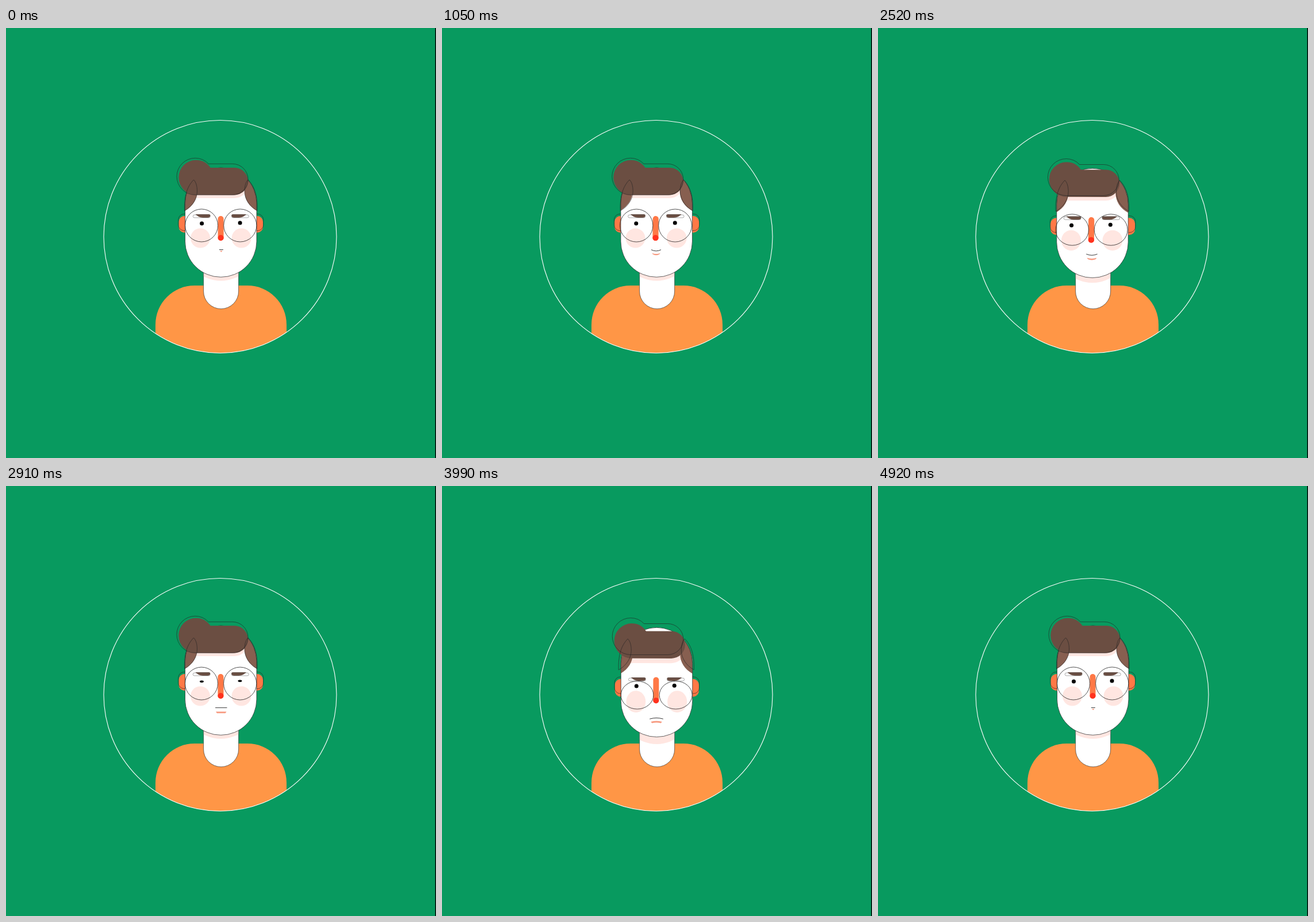
Write an HTML page with a canvas that moves like this. It is 748 px wide and 748 px high and loops after 4950 ms.

```html
<!DOCTYPE html>
<html lang="en">
<head>
<meta charset="utf-8">
<title>Portrait</title>
<style>
  html, body { margin: 0; width: 100%; height: 100%; overflow: hidden; background: #089a5f; }
  canvas { display: block; width: 100vw; height: 100vh; }
</style>
</head>
<body>
<canvas id="stage" width="748" height="748"></canvas>
<script>
const ctx = document.getElementById('stage').getContext('2d');
const LOOP = 4950;
const MID = 373.75;
const C = {
  bg: '#089a5f', shirt: '#ff9646', skin: '#fff', blush: '#ffe6e1', hair: '#6b4e42',
  lock: '#875f50', ear: '#ff7846', tip: '#ff321e', lip: '#f79a80', line: '#222'
};

const easeOut = p => 1 - (1 - p) ** 3;
const easeSine = p => (1 - Math.cos(Math.PI * p)) / 2;
const easeBack = p => 1 + 2.9 * (p - 1) ** 3 + 1.9 * (p - 1) ** 2;

// Tracks: [time, value, easing of the move that ends here]
const TURN = [[0, 0], [570, 1], [900, 1], [1230, 0, easeBack], [1530, 0], [2040, -.15], [2490, -.15], [3030, 0]];
const RISE = [[3030, 0], [3600, 1], [3660, 1], [4300, 0]];
const DROP = [[1530, 0], [2040, .36], [2490, .36], [3030, 0], [3660, 0], [4300, 1], [4590, 1], [4920, 0]];
const BLINK = [[330, 1], [450, .1, easeSine], [600, 1, easeSine], [2850, 1], [2970, .1, easeSine], [3120, 1, easeSine]];

// Mouth: half width, bend, lip half width, lip offset, lip height
const SMALL = [3.5, 0, 2, 2, 1.8];
const SMILE = [9.5, 2.6, 8.3, 6.5, 2.4];
const FLAT = [10.2, 0, 9.2, 6.8, 2.8];
const FROWN = [12, -2, 9.7, 4.6, 2.5];
const MOUTH = [[900, SMALL], [1230, SMILE], [2490, SMILE], [2900, FLAT], [3660, FLAT], [4300, FROWN], [4590, FROWN], [4920, SMALL]];

const mix = (a, b, p) => Array.isArray(a) ? a.map((x, i) => mix(x, b[i], p)) : a + (b - a) * p;

function sample(track, t) {
  const i = track.findIndex(k => k[0] > t);
  if (i < 0) return track[track.length - 1][1];
  if (i === 0) return track[0][1];
  const [t0, a] = track[i - 1], [t1, b, ease = easeOut] = track[i];
  return mix(a, b, ease((t - t0) / (t1 - t0)));
}

function fill(color) {
  ctx.fillStyle = color;
  ctx.fill();
}

function stroke(color = C.line, width = .7) {
  ctx.strokeStyle = color;
  ctx.lineWidth = width;
  ctx.stroke();
}

function box(x, y, w, h, r) {
  ctx.beginPath();
  ctx.roundRect(x, y, w, h, r);
}

function oval(x, y, rx, ry = rx) {
  ctx.beginPath();
  ctx.ellipse(x, y, rx, ry, 0, 0, 2 * Math.PI);
}

function clipped(shape, draw) {
  ctx.save();
  shape();
  ctx.clip();
  draw();
  ctx.restore();
}

// Draws with the right-hand side as is (s = 1) or mirrored (s = -1)
function side(s, dx, dy, draw) {
  ctx.save();
  ctx.translate(MID + dx, dy);
  ctx.scale(s, 1);
  ctx.translate(-MID, 0);
  draw();
  ctx.restore();
}

function quiff(cx, cy, r, right, top, bottom) {
  const k = (bottom - top) / 2;
  ctx.beginPath();
  ctx.arc(cx, cy, r, Math.PI / 2, 2 * Math.PI + Math.asin((top - cy) / r));
  ctx.arcTo(right, top, right, bottom, k);
  ctx.arcTo(right, bottom, cx, bottom, k);
  ctx.closePath();
}

function lockFill() {
  ctx.beginPath();
  ctx.moveTo(421, 250);
  ctx.lineTo(470, 250);
  ctx.lineTo(470, 325);
  ctx.lineTo(442, 320.5);
  ctx.bezierCurveTo(424, 313, 415, 299, 415, 284);
  ctx.bezierCurveTo(415, 275, 417, 268, 421, 250);
  fill(C.lock);
}

function lockLine() {
  ctx.beginPath();
  ctx.moveTo(421, 264);
  ctx.bezierCurveTo(432, 275, 438, 292, 437, 318);
  ctx.bezierCurveTo(424, 311, 415, 298, 415, 284);
  ctx.bezierCurveTo(415, 275, 417, 268, 421, 264);
  stroke(C.line, .6);
}

function brow() {
  ctx.beginPath();
  ctx.moveTo(418, 324);
  ctx.lineTo(395, 324);
  ctx.quadraticCurveTo(391.5, 324, 392.3, 327);
  ctx.quadraticCurveTo(393, 330, 397, 330);
  ctx.lineTo(405, 330);
  ctx.quadraticCurveTo(413, 329.5, 418, 324);
  fill(C.hair);
  box(392.3, 325, 30, 5, 2.5);
  stroke('#555', .5);
}

function mouth(x, y, [w, bend, lw, gap, h]) {
  ctx.beginPath();
  ctx.moveTo(x - w, y);
  ctx.quadraticCurveTo(x, y + 2 * bend, x + w, y);
  stroke(C.line, .9);
  const top = y + gap, inset = Math.min(1.8, lw * .6);
  ctx.beginPath();
  ctx.moveTo(x - lw, top);
  ctx.quadraticCurveTo(x, top + 1.4 * bend, x + lw, top);
  ctx.lineTo(x + lw - inset, top + h);
  ctx.quadraticCurveTo(x, top + h + 1.4 * bend, x - lw + inset, top + h);
  ctx.closePath();
  fill(C.lip);
}

function backdrop() {
  ctx.fillStyle = C.bg;
  ctx.fillRect(0, 0, 748, 748);
  ctx.fillStyle = '#000';
  ctx.fillRect(746.6, 0, 1.4, 748);
  const ring = () => oval(372.5, 363, 202.5);
  clipped(ring, () => {
    box(260, 448, 228, 200, 68);
    fill(C.shirt);
  });
  ring();
  stroke('#fff', 1.1);
}

function draw(t) {
  const turn = sample(TURN, t), rise = sample(RISE, t), drop = sample(DROP, t);
  // Rest value plus its shift when turned right, raised and lowered
  const v = (rest, r = 0, u = 0, d = 0) => rest + turn * r + rise * u + drop * d;

  backdrop();

  const headX = v(311.5, 6, -2.5, 0), headY = v(243, 0, -2.5, 4);
  const head = (dy = 0) => box(headX, headY + dy, 124.5, 190.3, 62.2);
  const neck = () => box(343.6, 390, 61, 98.5, 30.5);

  neck();
  fill(C.skin);
  clipped(neck, () => {
    head(v(6.5, -.5, -3.5, 7));
    fill(C.blush);
  });
  neck();
  stroke(C.line, .6);

  const earY = v(0, 0, -9, 11);
  for (const s of [1, -1]) {
    const earX = s > 0 ? v(0, -1, -1, 0) : v(0, 3.5, 2.5, 0);
    side(s, earX, earY, () => {
      box(421, 327, 26, v(29, 0, -1, 2), 10);
      fill(C.ear);
    });
    side(s, earX, v(-3.5, 0, -6.5, 10.5), () => {
      box(421, 327, 26.7, 29, 10);
      stroke(C.line, .6);
    });
  }

  // Head, brow shadow and side hair
  const hairX = v(330.5, 21.5, -9.5, .5), hairRight = v(421, 14, -7, 3), hairY = v(0, 0, -7, 11.5);
  const hair = dy => quiff(hairX, 260 + dy, 30.3, hairRight, 243 + dy, 290.5 + dy);
  head();
  fill(C.skin);
  clipped(() => head(), () => {
    hair(hairY + v(5.5, 0, .5, 3));
    fill(C.blush);
    for (const s of [1, -1]) side(s, v(0, 13, -7, 0), v(0, 0, -11, 11), lockFill);
  });
  head();
  stroke();

  // Face
  oval(v(338, 16, -6, 0), v(365.5, -1, -13.5, 12.5), v(17, 0, -1), v(17, 0, -2.5, 2.5));
  fill(C.blush);
  oval(v(409.5, 13.5, -7, .5), v(365.5, -1, -13.5, 12.5), v(17, -3.5), v(17, 0, -2.5, 2.5));
  fill(C.blush);

  for (const s of [1, -1]) {
    const dx = s > 0 ? v(0, 20, -7, 0) : v(0, 16.5, -8.5, 0);
    const wide = s > 0 ? v(1, -.22, 0) : v(1, 0, -.1);
    side(s, dx, v(0, -.6, -7.5, 11.2), () => {
      ctx.translate(392, 0);
      ctx.scale(wide, 1);
      ctx.translate(-392, 0);
      brow();
    });
  }

  const open = 3.5 * sample(BLINK, t);
  oval(v(340.5, 28.5, -12, -1), v(340, 0, -15.5, 11), 3.5, open);
  fill('#000');
  oval(v(407, 18, -13, -1.5), v(339, 0, -14.5, 11), 3.5, open);
  fill('#000');

  const tipX = v(373.5, 21, -10.5, 0), tipY = v(365, -1, -20, 11.7);
  ctx.beginPath();
  ctx.moveTo(v(373.5, 18.5, -10, 0), v(332, 0, -7, 7));
  ctx.lineTo(tipX, tipY + v(0, .5, 2, -1));
  ctx.lineCap = 'round';
  stroke(C.ear, v(10, -1.5, -.5));
  ctx.lineCap = 'butt';
  oval(tipX, tipY, v(5, -1.2), 5);
  fill(C.tip);

  mouth(v(374.3, 19, -11.3, 0), v(385.6, -1, -22.6, 25), sample(MOUTH, t));

  const lensY = v(343.5, -1, -13.5, 24.5), lensR = v(28.5, 0, -1.5, -4.5);
  oval(v(340, 19, -8, .5), lensY, v(28.5, -2, -1.7), lensR);
  stroke(C.line, .8);
  oval(v(407.2, 17, -7.2, .3), lensY, v(28.6, -2.6, -1), lensR);
  stroke(C.line, .8);

  // Hair and its loose outlines
  hair(hairY);
  fill(C.hair);
  side(1, v(0, 7.5, -.5, 1.5), v(0, -.5, -8, 3), lockLine);
  side(-1, v(0, 3.3, -3.3, -3.3), v(0, 0, -7, 3), lockLine);
  const lineY = v(0, 0, -3, 4);
  quiff(v(329, 13, -7, 0), 258.3 + lineY, 32, v(421, 13, -7, -.5), 236.3 + lineY, 290.3 + lineY);
  stroke(C.line, .6);
}

function tick() {
  draw(performance.now() % LOOP);
  requestAnimationFrame(tick);
}
tick();
</script>
</body>
</html>
```
